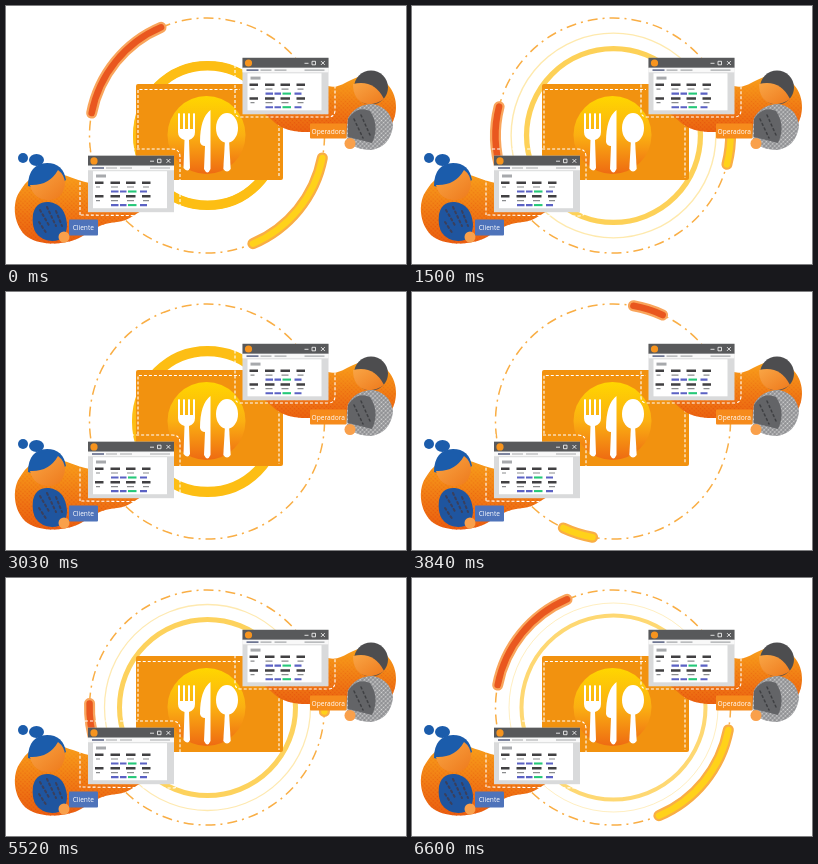
An HTML page that plays this animation: 400x258 px, repeating every 6.63 s.

```html
<!DOCTYPE html>
<html lang="es">
<head>
<meta charset="utf-8">
<style>
html, body { margin: 0; width: 100%; height: 100%; overflow: hidden; background: #fff }
svg { display: block; width: 100vw; height: 100vh }
text { font: 6.6px "Open Sans", "Noto Sans", sans-serif; fill: #fff; text-anchor: middle }
.line { fill: none; stroke-linecap: round }
.march { fill: none; stroke: #fff; stroke-width: 1.1; stroke-dasharray: 3 2 }
</style>
</head>
<body>
<svg viewBox="0 0 400 258">
<defs>
  <linearGradient id="plate" x2="0" y2="1"><stop stop-color="#ffd600"/><stop offset=".5" stop-color="#fbb012"/><stop offset="1" stop-color="#ee6a12"/></linearGradient>
  <linearGradient id="blob" x2="0" y2="1"><stop stop-color="#f9a01b"/><stop offset="1" stop-color="#ea5f10"/></linearGradient>
  <linearGradient id="skin" x2="1" y2="1"><stop stop-color="#f9a545"/><stop offset="1" stop-color="#ee7a1c"/></linearGradient>
  <linearGradient id="fade" x2="0" y2="1"><stop stop-color="#fff" stop-opacity="0"/><stop offset="1" stop-color="#fff"/></linearGradient>
  <pattern id="dots" width="3" height="3" patternUnits="userSpaceOnUse" patternTransform="rotate(45)"><circle cx="1.5" cy="1.5" r=".8" fill="#e5500c"/></pattern>
  <pattern id="pale" width="3" height="3" patternUnits="userSpaceOnUse" patternTransform="rotate(45)"><circle cx="1.5" cy="1.5" r=".9" fill="#d5d5d5"/></pattern>
  <mask id="low"><rect y="165" width="170" height="75" fill="url(#fade)"/><rect x="240" y="75" width="160" height="55" fill="url(#fade)"/></mask>
  <path id="blobL" d="M38 167C58 165 70 176 90 178L145 190L140 203C130 206 124 215 111 216C95 217 86 224 75 231C59 240 31 240 19 229C7 217 6 196 14 185C20 175 28 168 38 167Z"/>
  <path id="blobR" d="M322 80C334 83 340 75 352 71C374 64 391 82 390 102C389 122 376 131 360 130C342 130 336 122 318 124C300 128 282 126 272 119C264 113 262 110 256 106V96L322 90Z"/>
  <path id="coat" d="M342 112Q350 98 367 98Q385 102 387 120Q384 141 365 144Q341 143 340 128Z"/>
  <g id="window">
    <rect width="86" height="56.5" fill="#d9dadb"/>
    <rect width="86" height="10" fill="#58595b"/>
    <circle cx="6" cy="5.2" r="3.6" fill="#f7941e"/>
    <path d="M62 5.500h4M69.500 3.500h3.500v3.500h-3.500zM78.500 3.300l3.800 3.800m0-3.800l-3.800 3.800" fill="none" stroke="#fff" stroke-width=".8"/>
    <rect y="10" width="86" height="4.500" fill="#f8f8f8"/>
    <path d="M4 12.300h12" stroke="#3f4a70" stroke-width="1.3"/>
    <path d="M18 12.300h11M32 12.300h12M62 12.300h20" stroke="#a7a9ac" stroke-width="1.1"/>
    <rect x="5" y="15.500" width="74" height="37" fill="#fff"/>
    <path d="M8 20.300h10" stroke="#a7a9ac" stroke-width="3"/>
    <g id="row">
      <path d="M7 27h8.500M22.500 27h9.500M38 27h9.500M54 27h8.500" stroke="#414042" stroke-width="2.5"/>
      <path d="M8 31.300h4M23 31.300h7M39 31.300h7M55 31.300h6" stroke="#8a8c8e" stroke-width="1.2"/>
      <path d="M23 35.800h7.500M32 35.800h6.500M52 35.800h7" stroke="#5b62c4" stroke-width="2.1"/>
      <path d="M40 35.800h8.500" stroke="#25c878" stroke-width="2.1"/>
    </g>
    <use href="#row" y="13.600"/>
  </g>
</defs>

<circle cx="201" cy="129.500" r="117.500" fill="none" stroke="#f9ae45" stroke-width="1.5" stroke-dasharray="10 5 2 5"/>
<g id="rings" fill="none" stroke="#fdbe14"><circle cx="201.500" cy="129.500"/><circle cx="201.500" cy="129.500"/></g>
<g id="arcs" class="line">
  <path stroke="#f9a55c" stroke-width="11"/><path stroke="#e9571f" stroke-width="6.500"/>
  <path stroke="#f9ad45" stroke-width="11"/><path stroke="#ffd21a" stroke-width="6.500"/>
</g>

<rect x="130" y="78" width="147" height="96" rx="2" fill="#f2920f"/>
<path class="march" d="M132 142V83.500H234M273 112V172"/>
<circle cx="200.500" cy="129" r="39" fill="url(#plate)"/>
<g fill="#fff">
  <path d="M172 108q1-2 2 0v15h3v-15q1-2 2 0v15h3v-15q1-2 2 0v15h3v-15q1-2 2 0v18q0 6-6 8l1 28q-2 5-6.500 0l1-28q-6.500-2-6.500-8z"/>
  <path d="M204.500 104V163Q201.500 170 198 163L199 140Q195 140 194 136Q194 112 204.500 104Z"/>
  <ellipse cx="221" cy="122" rx="11" ry="15"/>
  <path d="M219 134h4l1.700 29q-3.700 5-7.400 0z"/>
</g>

<use href="#blobL" fill="url(#blob)"/><use href="#blobR" fill="url(#blob)"/>
<g mask="url(#low)" fill="url(#dots)"><use href="#blobL"/><use href="#blobR"/></g>
<path class="march" d="M74 209V150Q74 143 80 143H166Q174 143 174 151V203Q174 210 166 210Z"/>
<path class="march" d="M229 54V105Q229 111 235 111H322Q329 111 329 104V55"/>
<use href="#window" x="82" y="149.700"/>
<use href="#window" x="236.500" y="51.800"/>

<g fill="#1b5cab">
  <circle cx="17" cy="152" r="5"/><ellipse cx="30.500" cy="154" rx="7.500" ry="6"/>
  <path d="M22 180Q22 158 41 157Q57 157 60 174L42 186Z"/>
</g>
<path d="M24 179Q43 180 52 164Q59 169 59 178Q57 194 42 194Q27 193 24 179Z" fill="url(#skin)"/>
<path d="M27 208Q30 195 43 196Q59 198 61 218Q61 235 46 235Q24 233 27 208Z" fill="#1f559f"/>
<path d="M34 204l10 17M41 201l9 19M33 216l8 12M50 205l6 15" class="line" stroke="#3a3f5c" stroke-width="2" stroke-dasharray="2 3"/>
<circle cx="58" cy="231" r="5.500" fill="#f9a04b"/>

<circle cx="365" cy="81.500" r="17" fill="#4d4d4f"/>
<path d="M347 78Q368 73 378 93Q370 99 361 98Q347 95 347 78Z" fill="url(#skin)"/>
<use href="#coat" fill="#8b8c8f"/>
<use href="#coat" fill="url(#pale)"/>
<path d="M342 113Q351 99 364 105Q374 120 366 137L342 131Z" fill="#636467"/>
<path d="M348 113l9 19M355 109l9 20" class="line" stroke="#3f4043" stroke-width="1.500" stroke-dasharray="2 3"/>
<circle cx="344" cy="137.500" r="5.500" fill="#f9a04b"/>

<rect x="63" y="213.500" width="29" height="16" rx="1" fill="#4e73ba"/><text x="77.300" y="224">Cliente</text>
<rect x="304" y="117.500" width="36.500" height="15" rx="1" fill="#f68b1c"/><text x="322.300" y="127.500">Operadora</text>
</svg>
<script>
const LOOP = 6630, STEP = 30, RADIUS = 117.5;
const $ = s => [...document.querySelectorAll(s)];
const rings = $('#rings circle'), arcs = $('#arcs path'), dashes = $('.march');

// [time, value] keys, angles in degrees and radii in pixels
const head = [[780, 320], [930, 312], [1200, 280], [1320, 191], [1500, 162], [1740, 160]];
const tail = [[780, 321], [1100, 317], [1200, 295], [1320, 247], [1560, 182], [1740, 160]];
const pulses = [
  [[860, 38], [930, 69.3], [1000, 69.6], [1220, 72.5], [1520, 88], [1600, 92], [1770, 105], [1820, 106.5]],
  [[860, 38], [930, 69.3], [1000, 70], [1220, 87], [1520, 103], [1600, 104.5], [1690, 106.5]]
];

// Smooth curve through the keys without overshoot
function curve(keys, t) {
  const last = keys.length - 1;
  if (t <= keys[0][0]) return keys[0][1];
  if (t >= keys[last][0]) return keys[last][1];
  const i = keys.findIndex(k => k[0] > t) - 1;
  const rate = n => (keys[n + 1][1] - keys[n][1]) / (keys[n + 1][0] - keys[n][0]);
  const slope = n => {
    if (n === 0 || n === last) return rate(n ? n - 1 : 0);
    const a = rate(n - 1), b = rate(n);
    return a * b > 0 ? 2 * a * b / (a + b) : 0;
  };
  const span = keys[i + 1][0] - keys[i][0], u = (t - keys[i][0]) / span, v = 1 - u;
  return v * v * (1 + 2 * u) * keys[i][1] + u * u * (3 - 2 * u) * keys[i + 1][1]
    + span * u * v * (v * slope(i) - u * slope(i + 1));
}

const point = deg => {
  const a = deg * Math.PI / 180;
  return (201 + RADIUS * Math.cos(a)).toFixed(2) + ' ' + (129.5 + RADIUS * Math.sin(a)).toFixed(2);
};

function draw(t) {
  let u = t % 1320;
  if (u < 460) u += 1320;
  const a = curve(head, u), b = curve(tail, u), shown = u > 780 && u < 1740;
  arcs.forEach((p, i) => {
    const turn = i < 2 ? 0 : 180;
    p.setAttribute('d', shown ? `M${point(a + turn)}A${RADIUS} ${RADIUS} 0 0 1 ${point(b + turn)}` : '');
  });

  u = t % 1000;
  if (u < 860) u += 1000;
  rings.forEach((c, i) => {
    const r = curve(pulses[i], u), left = Math.max(0, (106.5 - r) / 36);
    c.setAttribute('r', r);
    c.setAttribute('stroke-width', Math.min(9, 9 * left + .4));
    c.setAttribute('opacity', left ? Math.min(1, .25 + .85 * left) : 0);
  });

  dashes.forEach(d => d.style.strokeDashoffset = -130 * t / LOOP);
}

function tick() {
  draw(Math.floor(performance.now() % LOOP / STEP) * STEP);
  requestAnimationFrame(tick);
}
tick();
</script>
</body>
</html>
```
